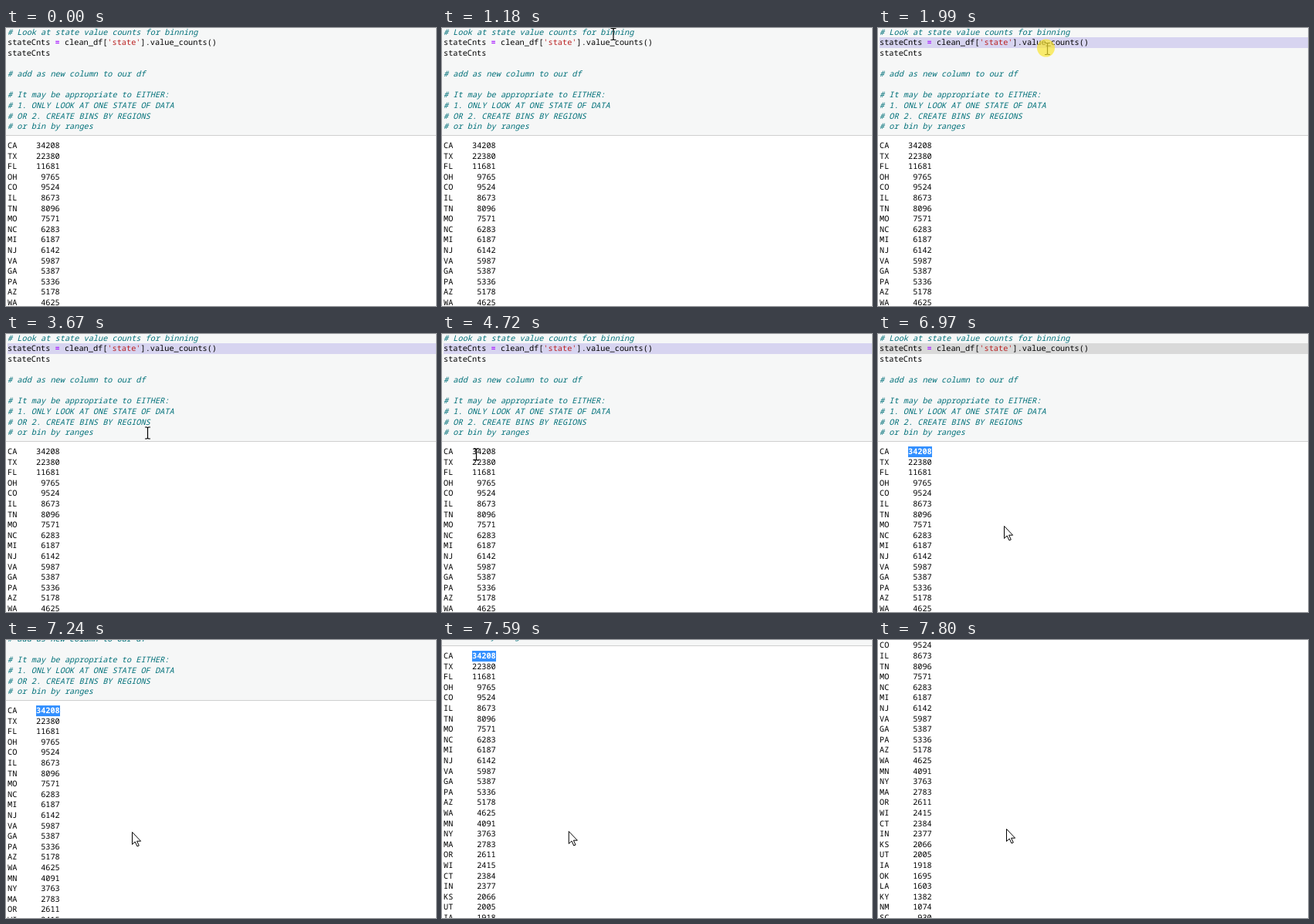
Recreate the animation shown at these times as an HTML page. Size 557 by 361 pixels, loop 8000 ms.

```html
<!DOCTYPE html>
<html>
<head>
<meta charset="utf-8">
<style>
  html, body { margin: 0; width: 100%; height: 100%; overflow: hidden; background: #fff; }
  svg { display: block; }
  text {
    font: 10.28px "Noto Sans Mono", "DejaVu Sans Mono", monospace;
    text-rendering: geometricPrecision;
    white-space: pre;
  }
  .comment { fill: #007079; font-style: italic; }
  .op { fill: #a2f; font-weight: bold; }
  .str { fill: #ba2121; }
  .picked { fill: #fff; font-weight: 600; }
</style>
</head>
<body>
<svg width="557" height="361" viewBox="0 0 557 361">
  <g id="page">
    <rect width="557" height="139" fill="#f6f7f7"/>
    <rect y="139" width="557" height="1" fill="#cfcfcf"/>
    <rect id="codeMark" y="12" height="14"/>
    <rect id="countMark" x="39" y="146" width="31" height="14" fill="#3390ff"/>
    <g id="lines"></g>
  </g>
  <g id="pointer">
    <path id="beam" d="M-3.5-7.5h2.5l1 1 1-1h2.5M0-6.5v13M-3.5 7.5h2.5l1-1 1 1h2.5" fill="none" stroke="#000" stroke-width="1.2"/>
    <path id="arrow" d="M.5.5v16l3.7-3.5 2.8 6 2.3-1-2.7-5.8h5z" fill="#fff" stroke="#000"/>
    <circle id="click" cx="-2" cy="-1" r="11.5" fill="#fae632" opacity=".7"/>
  </g>
</svg>
<script>
const LOOP = 8000, STEP = 70, LEFT = 2, CHAR = 6.168, LEADING = 13.6;
const el = id => document.getElementById(id);

const code = `# Look at state value counts for binning
stateCnts = clean_df['state'].value_counts()
stateCnts

# add as new column to our df

# It may be appropriate to EITHER:
# 1. ONLY LOOK AT ONE STATE OF DATA
# OR 2. CREATE BINS BY REGIONS
# or bin by ranges`;

const output = `CA 34208, TX 22380, FL 11681, OH 9765, CO 9524, IL 8673, TN 8096,
  MO 7571, NC 6283, MI 6187, NJ 6142, VA 5987, GA 5387, PA 5336, AZ 5178, WA 4625,
  MN 4091, NY 3763, MA 2783, OR 2611, WI 2415, CT 2384, IN 2377, KS 2066, UT 2005,
  IA 1918, OK 1695, LA 1603, KY 1382, NM 1074, SC 930`;

const span = (kind, text) => `<tspan class="${kind}">${text}</tspan>`;
const highlight = text => text.replace(/^#.*|'\w+'|=/, '\0$&')
  && text.replace(/^#.*|'\w+'|=/g, token =>
    span({ '#': 'comment', "'": 'str', '=': 'op' }[token[0]], token));
const formatCount = row => {
  const [state, count] = row.trim().split(' ');
  return `${state}    <tspan>${count.padStart(5)}</tspan>`;
};
const typeset = (rows, baseline) => rows.map((row, i) =>
  `<text x="${LEFT}" y="${Math.round(baseline + i * LEADING)}">${row}</text>`).join('');

el('lines').innerHTML =
  typeset(code.split('\n').map(text => highlight(text)), 8.7) +
  typeset(output.split(',').map(formatCount), 156);
const topCount = el('lines').querySelector('tspan:not([class])');

// Fraction of a movement done, advancing once per STEP.
const progress = (t, start, steps) =>
  Math.max(0, Math.min(1, (Math.floor((t - start) / STEP) + 1) / steps));

// The pointer glides from one resting place to the next.
const entry = { x: 528, y: 370 };
const glides = [
  { start: 260, steps: 12, x: 201, y: 20 },
  { start: 1110, steps: 2, x: 222, y: 8 },
  { start: 1320, steps: 2, x: 222, y: 20 },
  { start: 1650, steps: 5, x: 219.5, y: 27 },
  { start: 2590, steps: 8, x: 276, y: 157 },
  { start: 3670, steps: 1, x: 183.5, y: 128.5 },
  { start: 3740, steps: 10, x: 53.5, y: 162 },
  { start: 4580, steps: 4, x: 41.5, y: 154.5 },
  { start: 5850, steps: 12, x: 150, y: 313 },
  { start: 6690, steps: 5, x: 163, y: 249 },
  { start: 7590, steps: 4, x: 166, y: 245 }
];
const pointerAt = t => glides.reduce((from, to) => {
  const p = progress(t, to.start, to.steps);
  return { x: from.x + (to.x - from.x) * p, y: from.y + (to.y - from.y) * p };
}, entry);

// One notch of the mouse wheel, easing out.
const wheel = (t, start) => 100 * (1 - (1 - progress(t, start, 4)) ** 1.36);

const show = (id, on) => el(id).setAttribute('visibility', on ? 'visible' : 'hidden');
const moveTo = (id, x, y) => el(id).setAttribute('transform', `translate(${x} ${y})`);

function draw(t) {
  moveTo('page', 0, -Math.round(wheel(t, 7170) + wheel(t, 7590)));

  const wholeLine = t >= 1930;
  const mark = el('codeMark');
  mark.setAttribute('x', wholeLine ? LEFT : LEFT + 30 * CHAR);
  mark.setAttribute('width', wholeLine ? 555 : 12 * CHAR);
  mark.setAttribute('fill', t < 5250 ? '#d7d4f0' : '#d9d9d9');
  show('codeMark', t >= 1790);

  const picked = t >= 5390;
  show('countMark', picked);
  topCount.setAttribute('class', picked ? 'picked' : '');

  const { x, y } = pointerAt(t);
  const overText = y < 139 || x < 74;
  moveTo('pointer', x, y);
  show('beam', overText);
  show('arrow', !overText);
  show('click', (t >= 1650 && t < 2060) || (t >= 5250 && t < 5520));
}

function tick() {
  draw(performance.now() % LOOP);
  requestAnimationFrame(tick);
}
tick();
</script>
</body>
</html>
```
